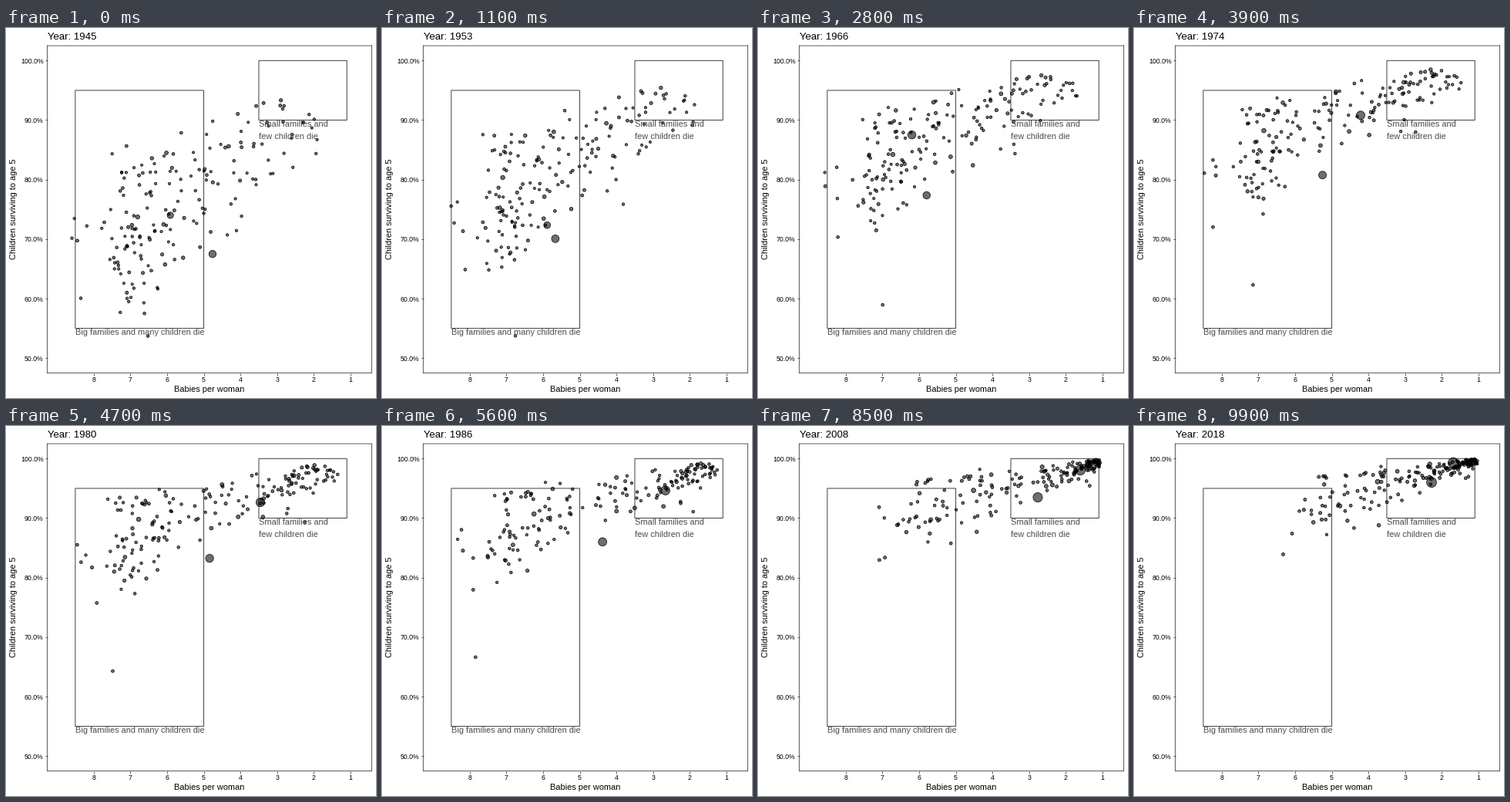
Recreate the animation shown at these times as a matplotlib script. Size 480 by 480 pixels, loop 10 s.

```python
import numpy as np
import matplotlib.pyplot as plt
from matplotlib.animation import FuncAnimation
from matplotlib.patches import Rectangle

SIZE, FRAMES, STEP = 480, 100, 100
START, END = 1945, 2018
COUNTRIES = 180
plt.rcParams["font.family"] = "Liberation Sans"

# Key points (year, babies, survival) with first and last radius
GIANTS = [
    (4.7, 6.6, [(1945, 4.76, 67.5), (1953, 5.66, 69.9), (1966, 6.21, 88.0),
                (1974, 4.15, 90.9), (1986, 2.68, 94.6), (2008, 1.59, 98.1),
                (2018, 1.69, 99.3)]),
    (4.1, 6.4, [(1945, 5.91, 74.0), (1953, 5.89, 72.3), (1966, 5.79, 77.5),
                (1986, 4.40, 85.9), (2008, 2.74, 93.6), (2018, 2.28, 96.0)]),
    (1.8, 2.0, [(1945, 6.52, 53.7), (1953, 6.75, 53.7), (1974, 7.15, 62.4),
                (1986, 7.85, 66.4), (2008, 7.07, 83.2), (2018, 6.08, 87.4)]),
]

rng = np.random.default_rng(12)
level = np.linspace(0, 1, COUNTRIES)  # 0 = poorest, 1 = richest


def near_level(spread):
    """Each country's level with some seeded scatter."""
    return np.clip(level + rng.normal(0, spread, COUNTRIES), 0, 1)


# Families shrink along an S-curve from `high` to `low` around `turn`
u = near_level(.04)
high = 7.5 - 1.9 * u - 3.6 * u ** 3.2 + .9 * np.exp(-u / .03)
low = 1.05 + 3.45 * (1 - near_level(.05)) ** 1.7
turn = (1975 + 37 / (1 + np.exp(9 * (near_level(.06) - .42)))
        + rng.normal(0, 2, COUNTRIES))
PACE = 10

# Child deaths decay exponentially
u = near_level(.08)
deaths0 = 33 - 23 * u ** 2.5
rate = (.0145 + .042 * u - .012 * u * u) * (1 + rng.normal(0, .1, COUNTRIES))
luck = 1.3 * rng.beta(3, 1.4, COUNTRIES) - 1

phase = rng.uniform(0, 2 * np.pi, (2, COUNTRIES))
tempo = rng.uniform(.15, .35, COUNTRIES)
radius = np.minimum(1.55 + .2 * np.exp(.8 * rng.normal(size=COUNTRIES)), 2.8)


def cloud(year):
    """Babies per woman and child deaths in percent for all countries."""
    age = year - START
    babies = low + (high - low) / (1 + np.exp((year - turn) / PACE))
    babies *= 1 + .025 * np.sin(tempo * age + phase[0])
    spread = 1 + .5 * age / (END - START)
    wobble = .05 * np.sin(tempo * age + phase[1])
    return babies, deaths0 * np.exp(spread * luck - rate * age + wobble)


def country_near(year, babies):
    return np.abs(cloud(year)[0] - babies).argmin()


# One-year disasters: country, year, deaths at the peak
SHOCKS = [(country_near(1994.4, 6.3), 1994.4, 29),
          (country_near(2009.9, 3.5), 2009.9, 21.5)]


def state(year):
    """Positions and marker areas of every dot, giants first."""
    p = (year - START) / (END - START)
    babies, deaths = cloud(year)
    for i, when, peak in SHOCKS:
        deaths[i] += (peak - deaths[i]) * max(0, 1 - abs(year - when))
    spots, sizes = [], []
    for first, last, path in GIANTS:
        years, kids, alive = zip(*path)
        spots.append((np.interp(year, years, kids), np.interp(year, years, alive)))
        sizes.append(first + (last - first) * p)
    spots = np.vstack([spots, np.column_stack([babies, 100 - deaths])])
    r = np.append(sizes, radius * (1 + .1 * p))
    return spots, (2 * r) ** 2


fig = plt.figure(figsize=(SIZE / 72, SIZE / 72), dpi=72, facecolor="white")
ax = fig.add_axes([53.5 / SIZE, 1 - 447.5 / SIZE, 421 / SIZE, 424.5 / SIZE])
ax.set_xlim(9.264, .422)
ax.set_ylim(47.5, 102.5)
ax.set_xticks(range(1, 9))
ax.set_yticks(range(50, 101, 10), [f"{v}.0%" for v in range(50, 101, 10)])
ax.tick_params(length=2.75, width=.8, pad=2.2, labelsize=8.8,
               color="#333333", labelcolor="black")
for side in ax.spines.values():
    side.set(color="#333333", linewidth=.8, snap=False)


def label(x, y, text, size, color="black", **kw):
    return fig.text(x / SIZE, 1 - y / SIZE, text, fontsize=size, color=color,
                    va="baseline", **kw)


def zone(left, right, bottom, top):
    ax.add_patch(Rectangle((right, bottom), left - right, top - bottom,
                           fill=False, edgecolor="#4d4d4d", linewidth=1.07,
                           snap=False, zorder=1))


GREY = "#4d4d4d"
zone(8.5, 5, 55, 95)
zone(3.5, 1.1, 90, 100)
label(90, 398, "Big families and many children die", 11.04, GREY, zorder=0)
label(328, 128, "Small families and", 11.04, GREY, zorder=0)
label(328, 144, "few children die", 11.04, GREY, zorder=0)
label(264, 472, "Babies per woman", 11, ha="center")
label(13.5, 235, "Children surviving to age 5", 11, ha="center",
      rotation=90, rotation_mode="anchor")
title = label(54, 15, "", 13.2)

ax.patch.set_visible(False)
dots = ax.scatter([], [], facecolor=(0, 0, 0, .57), edgecolor="black",
                  linewidth=.7, zorder=3)


def draw(f):
    year = START + (END - START) * f / (FRAMES - 1)
    spots, areas = state(year)
    dots.set_offsets(spots)
    dots.set_sizes(areas)
    title.set_text(f"Year: {round(year)}")
    return dots, title


anim = FuncAnimation(fig, draw, frames=FRAMES, interval=STEP,
                     repeat=True, repeat_delay=0)
plt.show()
```
